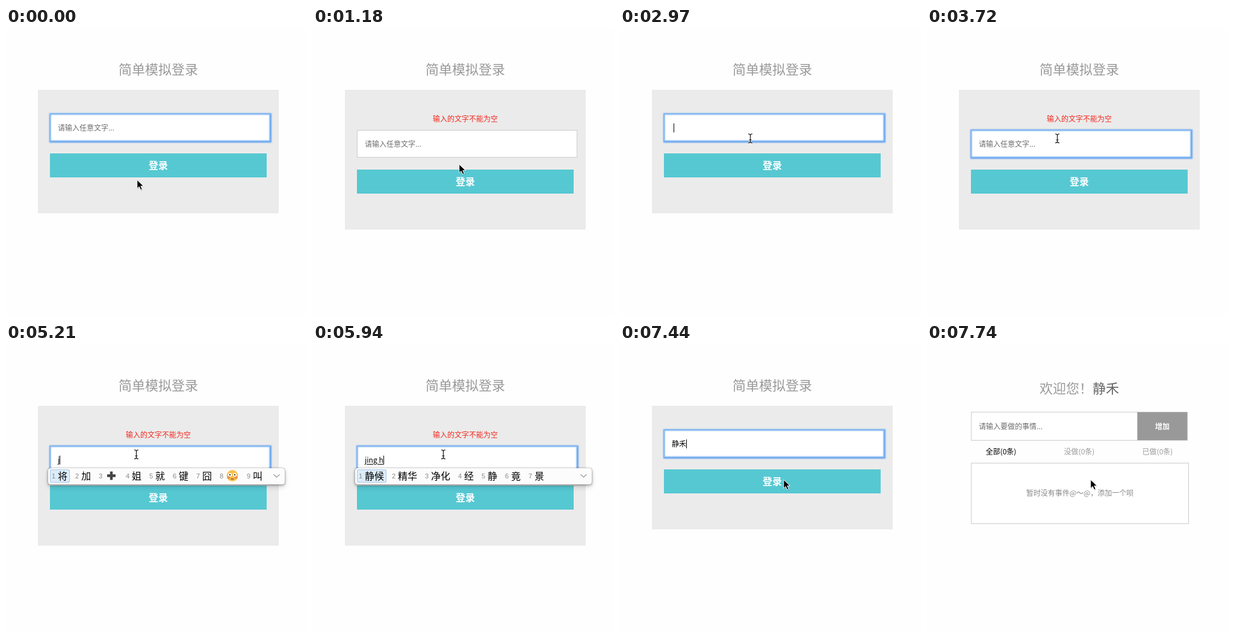
Write an HTML page that moves like this. It is 500x480 px and loops after 8000 ms.

```html
<!DOCTYPE html>
<html lang="zh-CN">
<head>
<meta charset="utf-8">
<title>简单模拟登录</title>
<style>
html, body { margin: 0; width: 100%; height: 100%; overflow: hidden; background: #fefefe; }
body { position: relative; font: 500 12px "Noto Sans CJK SC", "Noto Sans CJK", sans-serif; }
div, svg.pointer { position: absolute; box-sizing: border-box; white-space: nowrap; }
.center { text-align: center; }
.timed { animation: 8s step-end infinite; }

h1 { position: absolute; left: 53px; width: 400px; margin: 0; text-align: center;
  font-size: 22px; font-weight: 500; line-height: 30px; color: #999; }
h1 b { font-weight: 500; color: #666; }

/* login page */
.panel { left: 53px; top: 103px; width: 400px; background: #ebebeb; animation-name: grow; }
.error { left: 0; top: 38px; width: 400px; line-height: 20px; color: #f3281e; animation-name: error; }
.form { left: 20px; width: 366px; animation-name: shift; }
.field { left: 0; top: 0; width: 366px; height: 46px; line-height: 46px; background: #fff;
  border: 1px solid #ccc; }
.ring { left: -1px; top: -1px; width: 366px; height: 46px; border: 1px solid #7fb4f0;
  box-shadow: 0 0 2px 1.5px #62a3f0, inset 0 0 2px 1px #a5cbf6; animation-name: focus; }
.hint { left: 12px; top: -1px; color: #6c6c6c; animation-name: hint; }
.caret { left: 12px; top: 15px; width: 1px; height: 15px; background: #000; animation-name: caret; }
.name { left: 12px; top: -1px; color: #000; animation-name: name; }
.submit { left: 0; top: 66px; width: 360px; height: 40px; line-height: 39px;
  font-size: 16px; font-weight: 700; color: #fff; background: #56c8d2; }

/* input method */
.slot { visibility: hidden; animation: slot 8s step-end infinite; }
.pinyin { left: 12px; top: 15px; height: 15px; line-height: 14px; color: #000; border-right: 1px solid #000; }
.pinyin u { text-underline-offset: 2px; }
.bar { left: 70px; top: 207px; width: 393px; height: 27px; padding: 2px 3px; display: flex;
  border-radius: 4px; background: #fcfcfc; color: #000; font-size: 16px;
  box-shadow: 0 0 1px #0008, 0 1px 4px #0006, 0 5px 9px #0002; }
.bar span { display: flex; height: 22px; line-height: 21px; padding: 0 4px 0 3px; margin-right: 6px; border-radius: 3px; }
.bar i { width: 10px; font: 11px/22px "Liberation Sans", sans-serif; color: #888; }
.bar .on { background: #dcecfa; box-shadow: inset 0 0 0 1px #a8cbe9; }
.bar svg { width: 22px; height: 22px; }
.bar .more { position: absolute; right: 3px; top: 2px; }

/* list page */
.home { left: 0; top: 0; width: 500px; height: 480px; background: #fefefe; color: #999; animation-name: home; }
.home .box { border: 1px solid #ccc; background: #fff; }
.tab { top: 170px; width: 130px; line-height: 18px; }

.pointer { left: 0; top: 0; overflow: visible; width: 1px; height: 1px; }
.arrow { animation-name: arrow; }
.beam { animation-name: beam; }

@keyframes slot { 0% { visibility: visible; } 1.84375%, 100% { visibility: hidden; } }
@keyframes grow { 0%, 37.125%, 78%, 100% { height: 206px; } 14.75%, 46.5% { height: 233px; } }
@keyframes shift { 0%, 37.125%, 78%, 100% { top: 40px; } 14.75%, 46.5% { top: 67px; } }
@keyframes error { 0%, 37.125%, 78%, 100% { visibility: hidden; } 14.75%, 46.5% { visibility: visible; } }
@keyframes focus { 0%, 27.75%, 100% { visibility: visible; } 9.25% { visibility: hidden; } }
@keyframes hint { 0%, 46.5% { visibility: visible; } 37.125%, 63.25%, 100% { visibility: hidden; } }
@keyframes name { 0% { visibility: hidden; } 78%, 100% { visibility: visible; } }
@keyframes home { 0% { visibility: hidden; } 96.75%, 100% { visibility: visible; } }
@keyframes caret {
  0%, 33.375%, 44.625%, 55.875%, 85.5%, 100% { visibility: hidden; }
  27.75%, 50.25% { visibility: visible; left: 12px; }
  37.125% { visibility: visible; left: 15px; }
  78%, 91.125% { visibility: visible; left: 36px; }
}
@keyframes arrow {
  0% { visibility: visible; transform: translate(217px, 252px); }
  1.875% { visibility: visible; transform: translate(222px, 246px); }
  3.75% { visibility: visible; transform: translate(231px, 237px); }
  5.625% { visibility: visible; transform: translate(239px, 229px); }
  7.375% { visibility: visible; transform: translate(242px, 226px); }
  20.375% { visibility: visible; transform: translate(238px, 219px); }
  22.25% { visibility: hidden; }
  87.375% { visibility: visible; transform: translate(285px, 236px); }
  89.25% { visibility: visible; transform: translate(350px, 268px); }
  91.125% { visibility: visible; transform: translate(302px, 243px); }
  93%, 100% { visibility: visible; transform: translate(271px, 225px); }
}
@keyframes beam {
  0% { visibility: hidden; }
  22.25% { visibility: visible; transform: translate(223px, 193px); }
  24% { visibility: visible; transform: translate(216px, 184px); }
  87.375%, 100% { visibility: hidden; }
}
</style>
</head>
<body>
<h1 style="top:52px">简单模拟登录</h1>
<div class="panel timed">
  <div class="error center timed">输入的文字不能为空</div>
  <div class="form timed">
    <div class="field">
      <div class="ring timed"></div>
      <div class="hint timed">请输入任意文字...</div>
      <div class="name timed">静禾</div>
      <div class="caret timed"></div>
    </div>
    <div class="submit center">登录</div>
  </div>
</div>

<div class="home timed">
  <h1 style="top:57px">欢迎您！<b>静禾</b></h1>
  <div class="box" style="left:73px;top:113px;width:277px;height:48px;line-height:46px;padding-left:12px;color:#6c6c6c">请输入要做的事情...</div>
  <div class="center" style="left:349px;top:113px;width:84px;height:48px;line-height:46px;border:1px solid #bbb;background:#999;color:#fff;font-weight:700">增加</div>
  <div class="tab center" style="left:58px;color:#000">全部(0条)</div>
  <div class="tab center" style="left:188px">没做(0条)</div>
  <div class="tab center" style="left:318px">已做(0条)</div>
  <div class="box center" style="left:73px;top:198px;width:362px;height:102px;line-height:98px;color:#888">暂时没有事件@～@，添加一个呗</div>
</div>

<svg class="pointer arrow timed">
  <path d="M.8 1.2V15.6L4.2 12.4L6.6 17.8L9.2 16.7L6.9 11.4H11.4Z" transform="translate(.6 1.2)" fill="#0004"/>
  <path d="M.8 1.2V15.6L4.2 12.4L6.6 17.8L9.2 16.7L6.9 11.4H11.4Z" fill="#000" stroke="#fff"/>
</svg>
<svg class="pointer beam timed" fill="none">
  <g id="ibeam"><path d="M-3 -7.5Q0 -7.5 .5 -5.5Q1 -7.5 4 -7.5M-3 7.5Q0 7.5 .5 5.5Q1 7.5 4 7.5M.5 -6V6M-1.5 2.5H2.5" stroke="#fff" stroke-width="2.4"/>
  <path d="M-3 -7.5Q0 -7.5 .5 -5.5Q1 -7.5 4 -7.5M-3 7.5Q0 7.5 .5 5.5Q1 7.5 4 7.5M.5 -6V6M-1.5 2.5H2.5" stroke="#111" stroke-width="1.2"/></g>
</svg>

<script>
const START = 5060, STEP = 147.5, LOOP = 8000;
const icons = {
  '+': '<svg viewBox="0 0 22 22"><path d="M11 3.5V17.5M4 10.5H18" stroke="#444" stroke-width="4.4"/></svg>',
  ':': '<svg viewBox="0 0 22 22"><circle cx="11" cy="10.5" r="9.4" fill="#f9c04a"/>' +
    '<g fill="#f08a5a"><circle cx="4.8" cy="13.4" r="2.4"/><circle cx="17.2" cy="13.4" r="2.4"/></g>' +
    '<g fill="#fff"><circle cx="7" cy="9" r="3.1"/><circle cx="15" cy="9" r="3.1"/></g>' +
    '<g fill="#5a3a20"><circle cx="7" cy="9" r="1.3"/><circle cx="15" cy="9" r="1.3"/></g>' +
    '<path d="M8.5 16H13.5" stroke="#7a4a20" stroke-width="1.4"/></svg>'
};
const more = '<svg class="more" viewBox="0 0 22 22"><path d="M6.5 8.5L11.5 13L16.5 8.5" fill="none" stroke="#999" stroke-width="1.3"/></svg>';
const last = '经合 静禾 精河 竞合 静 经 竟';
const typed = ['j', 'j', 'ji', 'jin', 'jing', 'jing h', 'jing he', 'jing he'];
const lists = ['', '将 加 + 姐 就 键 囧 : 叫', '级 几 及 记 机 即 既 急 寄', '进 近 今 金 仅 尽 紧 劲 斤',
  '经 静 竟 景 京 净 精 镜 敬', '静候 精华 净化 经 静 竟 景', last, last, last];

function addSlot(parent, type, step, html) {
  const el = document.createElement('div');
  el.className = 'slot ' + type;
  el.style.animationDelay = START + step * STEP - LOOP + 'ms';
  el.innerHTML = html;
  parent.append(el);
  return el;
}

const field = document.querySelector('.field');
const arrow = document.querySelector('.arrow');
typed.forEach((text, i) => addSlot(field, 'pinyin', i, `<u>${text}</u>`));
lists.forEach((list, i) => {
  if (!list) return;
  const chosen = i > 6 ? 1 : 0;
  const items = list.split(' ').map((word, n) =>
    `<span class="${n === chosen ? 'on' : ''}"><i>${n + 1}</i>${icons[word] || word}</span>`);
  const bar = addSlot(document.body, 'bar', i, items.join('') + more);
  if (i === 8) bar.style.opacity = .3;
  document.body.insertBefore(bar, arrow);
});
</script>
</body>
</html>
```
